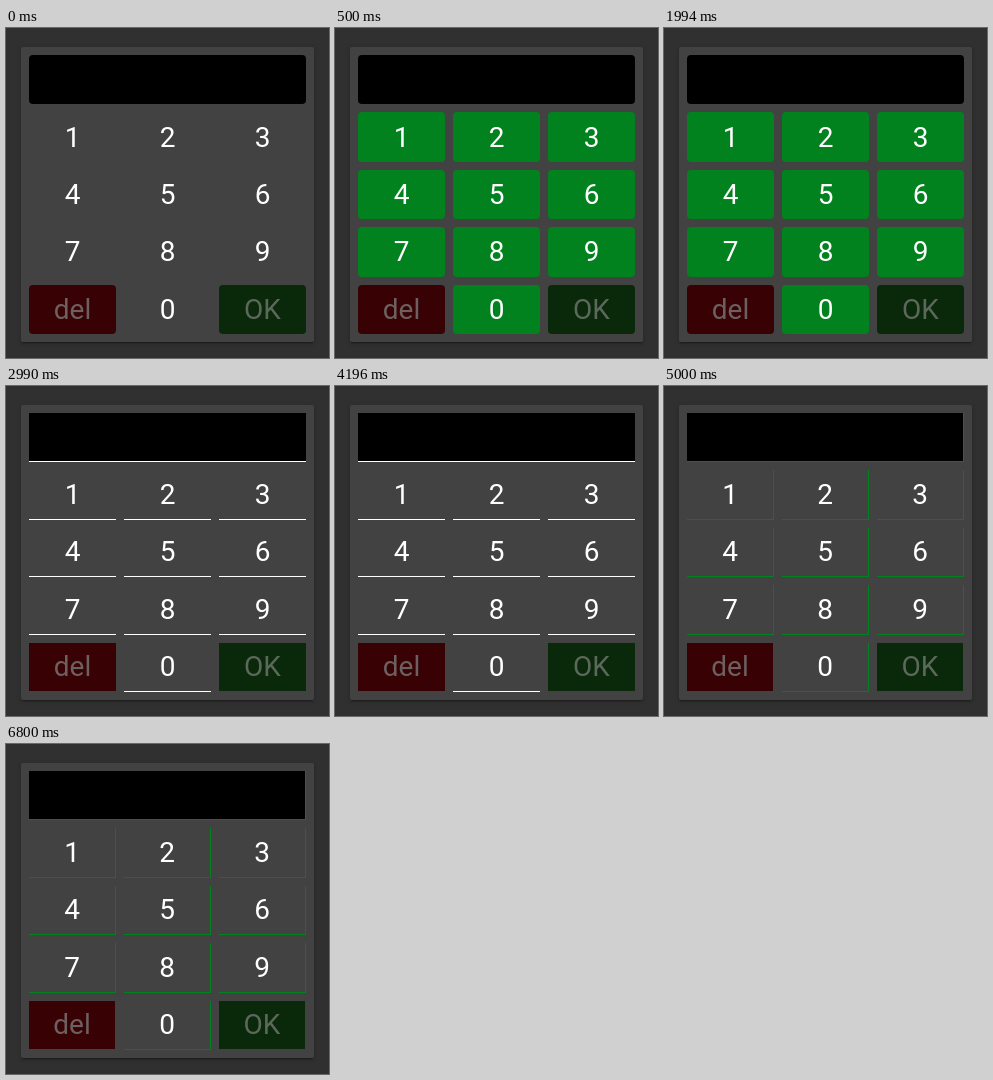
An HTML page that plays this animation: 323x330 px, repeating every 8000 ms.

```html
<!DOCTYPE html>
<html lang="en">
<head>
<meta charset="utf-8">
<title>Keypad themes</title>
<style>
  html, body { margin: 0; width: 100%; height: 100%; overflow: hidden; background: #303030; }
  #pad {
    position: absolute; left: 15px; top: 19px; width: 293px; height: 295px;
    box-sizing: border-box; padding: 8px; border-radius: 2px; background: #424242;
    box-shadow: 0 3px 1px -2px #0003, 0 2px 2px #0002, 0 1px 5px #0002;
    display: grid; grid-template: repeat(5, 49.4px) / repeat(3, 87px); gap: 8px;
    font: 28px Roboto, sans-serif; color: #fff;
  }
  #pad div {
    box-sizing: border-box; border: 0 solid #4e4e4e; border-radius: 4px;
    display: flex; align-items: center; justify-content: center;
  }
  #pad .screen { grid-column: 1 / 4; background: #000; }
  #pad .del { background: #380205; color: #6c6060; }
  #pad .ok { background: #0a280a; color: #5c685c; }

  #pad.filled .digit { background: #02821e; }

  #pad.underlined div { border-radius: 0; border-bottom: 1px solid #fff; }

  #pad.ruled div { border-radius: 0; border-width: 0 1px 1px 0; }
  #pad.ruled .middle { border-right-color: #02821e; }
  #pad.ruled .inner { border-bottom-color: #02821e; }

  #pad .del, #pad .ok { border-color: #424242 !important; }
</style>
</head>
<body>
<div id="pad"></div>
<script>
  const pad = document.getElementById('pad');
  const themes = [[5000, 'ruled'], [2990, 'underlined'], [500, 'filled'], [0, 'plain']];
  const LOOP = 8000;

  function addCell(text, classes) {
    const cell = document.createElement('div');
    cell.textContent = text;
    cell.className = classes;
    pad.append(cell);
  }

  addCell('', 'screen');
  for (let n = 1; n <= 9; n++) {
    addCell(n, 'digit' + (n % 3 === 2 ? ' middle' : '') + (n > 3 ? ' inner' : ''));
  }
  addCell('del', 'del');
  addCell('0', 'digit middle');
  addCell('OK', 'ok');

  function render() {
    const time = performance.now() % LOOP;
    const theme = themes.find(([start]) => time >= start)[1];
    if (pad.className !== theme) pad.className = theme;
    requestAnimationFrame(render);
  }
  render();
</script>
</body>
</html>
```
